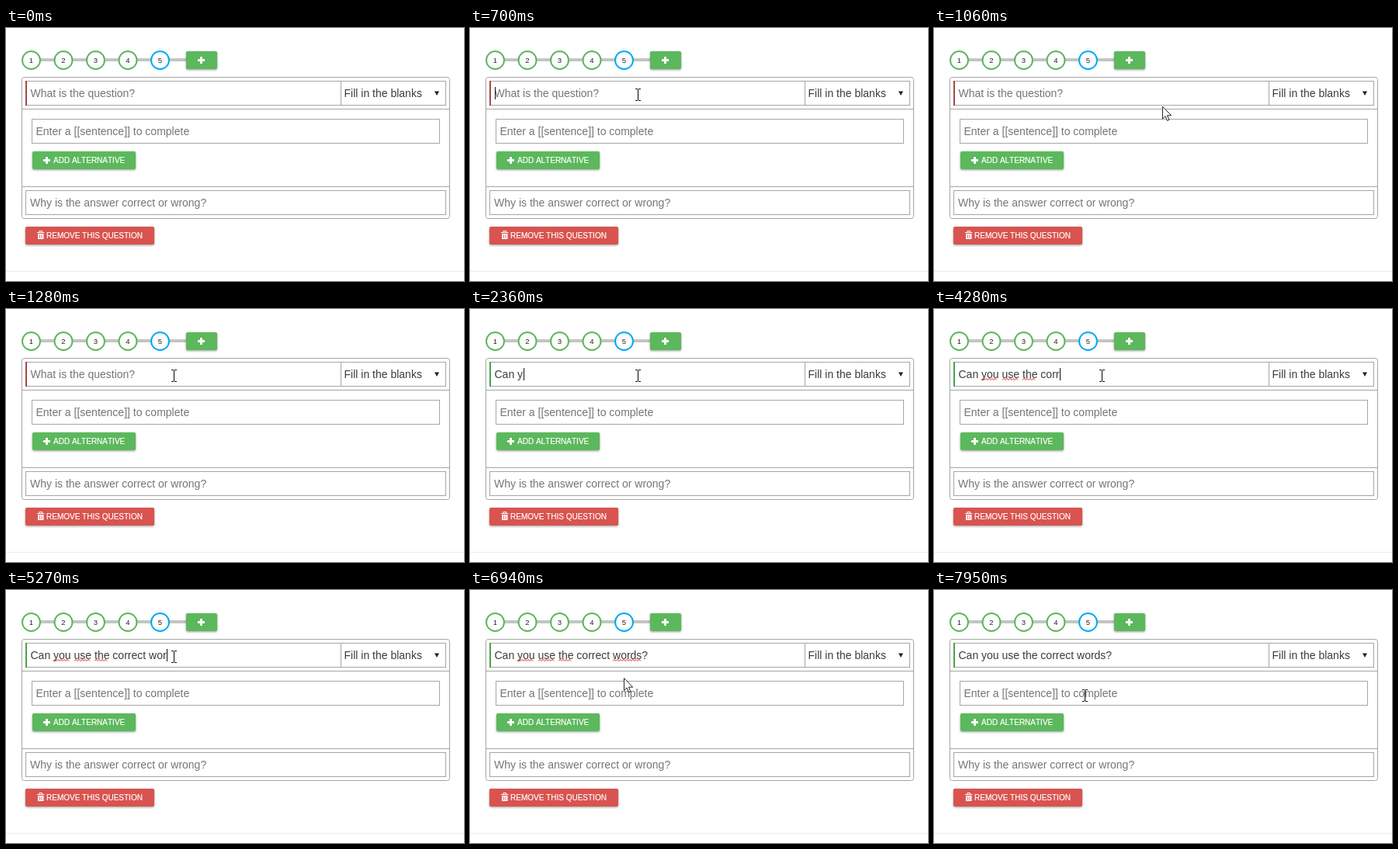
Recreate the animation shown at these times as an HTML page. Size 590 by 326 pixels, loop 8000 ms.

```html
<!DOCTYPE html>
<html lang="en">
<head>
<meta charset="utf-8">
<title>Question editor</title>
<style>
  html, body { margin: 0; width: 100%; height: 100%; overflow: hidden; background: #fff; }
  svg { display: block; width: 590px; height: 326px; }
  text { font: 14px "Liberation Sans", Arial, sans-serif; fill: #3c3c3c; font-kerning: none; white-space: pre; }
  .hint { fill: #757575; }
  .label { font-size: 10px; fill: #fff; stroke: #fff; stroke-width: .2; }
  .num { font-size: 9.5px; fill: #222; text-anchor: middle; }
  .box { fill: #fff; stroke: #a6a6a6; }
  .btn { filter: drop-shadow(0 1px 1.5px rgba(0, 0, 0, .4)); }
  .green { fill: #5cb85c; }
  .red { fill: #d9534f; }
</style>
</head>
<body>
<svg viewBox="0 0 590 326">
  <defs>
    <path id="plus" d="M-4.5-1.5h3v-3h3v3h3v3h-3v3h-3v-3h-3z" fill="#fff"/>
  </defs>
  <rect width="590" height="326" fill="#fff"/>

  <path d="M32 41H233" stroke="#c4c4c4" stroke-width="4"/>
  <g id="steps" fill="#fff" stroke-width="2"></g>
  <rect class="btn green" x="232" y="30" width="40" height="23" rx="2"/>
  <use href="#plus" x="251.5" y="41.5"/>

  <rect class="box" x="20.5" y="63.5" width="551" height="182" rx="3"/>
  <path d="M21 104.5H571M21 204.5H571" stroke="#a6a6a6"/>

  <rect class="box field" x="25.5" y="68.5" width="406" height="31"/>
  <rect id="bar" x="25" y="68" width="2" height="32"/>
  <text id="question" x="31.5" y="89"></text>
  <path id="squiggles" fill="none" stroke="#e02020"/>

  <rect class="box" x="431.5" y="68.5" width="135" height="31"/>
  <text x="435.5" y="89">Fill in the blanks</text>
  <path d="M552 81.5h6l-3 5.5z" fill="#222"/>

  <rect class="box field" x="33.5" y="117.5" width="525" height="31"/>
  <text class="hint" x="38.5" y="138">Enter a [[sentence]] to complete</text>
  <rect class="btn green" x="34" y="159" width="133" height="23" rx="2"/>
  <use href="#plus" x="52.5" y="170.5"/>
  <text class="label" x="61" y="174">ADD ALTERNATIVE</text>

  <rect class="box field" x="25.5" y="209.5" width="541" height="31"/>
  <text class="hint" x="31" y="230">Why is the answer correct or wrong?</text>

  <rect class="btn red" x="25" y="256" width="166" height="23" rx="2"/>
  <path d="M43 263v-1.5h3.5v1.5M40 263.5h9.5" fill="none" stroke="#fff"/>
  <path d="M41 265h7.5v7H41z" fill="#fff"/>
  <path d="M43.5 266v5M46 266v5" stroke="#d9534f" stroke-width=".8"/>
  <text class="label" x="52" y="271">REMOVE THIS QUESTION</text>

  <path d="M0 313.5H590" stroke="#ebebeb"/>

  <rect id="caret" width="1" height="16" fill="#111"/>
  <path id="beam" d="M-3.5-7.5h3m1 0h3M0-7V7M-3.5 7.5h3m1 0h3" fill="none" stroke="#111" stroke-width="1.1"/>
  <path id="arrow" d="M.5.5V16.5L4.1 13 6.6 18.8 9 17.8 6.5 12.1H11.7z"
        fill="#fff" stroke="#222" stroke-linejoin="round"/>
</svg>
<script>
const LOOP = 8000, BLINK = 530;
const FOCUS = 700, CUT = 1010, TYPE = 1740, LEAVE = 7410;
const HINT = "What is the question?";

// Typing bursts: text, first key, last key
const bursts = [
  ["Can", TYPE, 2080], [" you u", 2260, 2760], ["se ", 3010, 3200],
  ["the co", 3390, 3870], ["rrect words", 4090, 5560], ["?", 5970, 5970]
];
const TEXT = bursts.map(b => b[0]).join("");
const keys = bursts.flatMap(([s, from, to]) =>
  [...s].map((_, i) => from + (to - from) * i / Math.max(1, s.length - 1)));

// Pointer path: time, x, y
const path = [
  [30, 426, 290], [480, 207.5, 90], [560, 216.5, 86], [CUT, 216.5, 86],
  [CUT, 312, 104], [1280, 216.5, 86], [6660, 216.5, 86], [6940, 198, 113], [7190, 194.5, 136]
];

const $ = id => document.getElementById(id);
const show = (el, on) => el.setAttribute("visibility", on ? "visible" : "hidden");
const fields = [...document.querySelectorAll(".field")].map(el => el.getBBox());

const pen = document.createElement("canvas").getContext("2d");
pen.font = '14px "Liberation Sans", Arial, sans-serif';
const xAt = n => 32 + pen.measureText(TEXT.slice(0, n)).width;

$("steps").innerHTML = [1, 2, 3, 4, 5].map(n => {
  const x = 32.5 + (n - 1) * 41.5;
  return `<circle cx="${x}" cy="41.5" r="11.5" stroke="${n < 5 ? "#5cb85c" : "#03a9f4"}"/>
    <text class="num" x="${x}" y="45">${n}</text>`;
}).join("");

function squiggle(from, to) {
  let d = `M${Math.floor(xAt(from))} 91.5`;
  for (let n = Math.floor((xAt(to) - xAt(from)) / 4); n > 0; n--) d += "l2-2 2 2";
  return d;
}

// A flagged word is marked just after the key that ends it
const marks = [...TEXT.matchAll(/\b(you|use|the|words)\b/g)].map(m => {
  const end = m.index + m[0].length;
  return { time: keys[end] + 20, d: squiggle(m.index, end) };
});

function pointerAt(t) {
  const i = path.filter(p => p[0] <= t).length;
  if (!i) return null;
  const a = path[i - 1], b = path[i] || a;
  const k = (t - a[0]) / (b[0] - a[0] || 1);
  return b === a ? [a[1], a[2]] : [1, 2].map(c => a[c] + (b[c] - a[c]) * k);
}

function drawPointer(t) {
  const p = pointerAt(t);
  const onField = p && fields.some(f =>
    p[0] > f.x && p[0] < f.x + f.width && p[1] > f.y && p[1] < f.y + f.height);
  show($("beam"), p && onField);
  show($("arrow"), p && !onField);
  if (p) $(onField ? "beam" : "arrow").setAttribute("transform", `translate(${p})`);
}

function drawCaret(t, typed) {
  const left = t >= LEAVE;
  const since = t - Math.max(...[FOCUS, LEAVE, ...keys].filter(k => k <= t));
  const focused = t >= FOCUS && (t < CUT || t >= TYPE);
  $("caret").setAttribute("x", left ? 39 : Math.round(xAt(typed)));
  $("caret").setAttribute("y", left ? 125 : 76);
  show($("caret"), focused && since % (2 * BLINK) < BLINK);
}

function draw(t) {
  const typed = keys.filter(k => k <= t).length;
  $("question").textContent = typed ? TEXT.slice(0, typed) : HINT;
  $("question").setAttribute("class", typed ? "" : "hint");
  $("bar").setAttribute("fill", typed ? "#42a948" : "#a94442");
  $("squiggles").setAttribute("d", marks.filter(m => m.time <= t && t < LEAVE).map(m => m.d).join(""));
  drawCaret(t, typed);
  drawPointer(t);
}

const start = performance.now();
function tick() {
  draw((performance.now() - start) % LOOP);
  requestAnimationFrame(tick);
}
tick();
</script>
</body>
</html>
```
